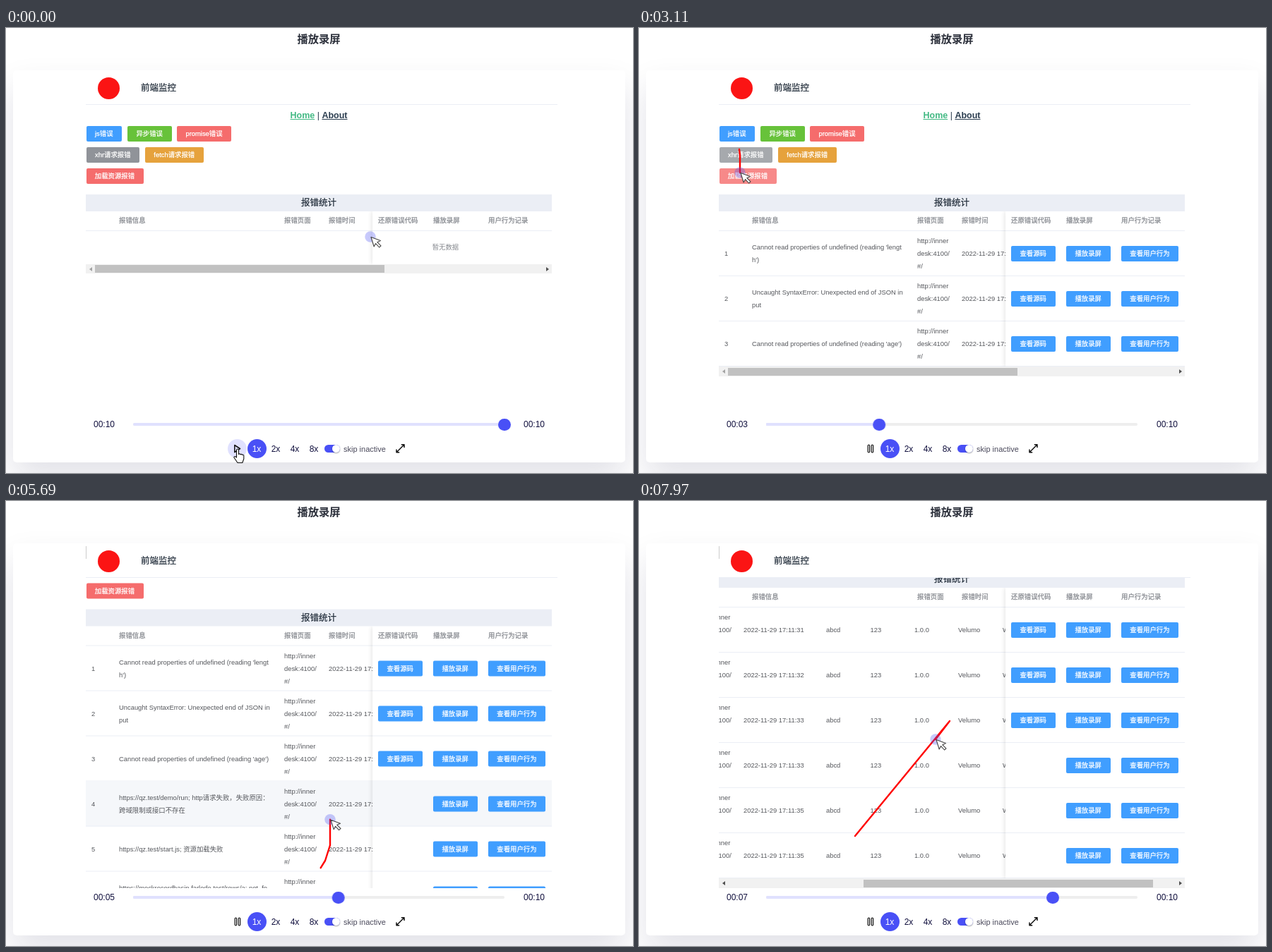
Recreate the animation shown at these times as an HTML page. Size 888 px wide and 631 px high, loop 8 s.

```html
<!DOCTYPE html>
<html lang="zh">
<head>
<meta charset="utf-8">
<title>播放录屏</title>
<style>
  html, body { margin: 0; width: 100%; height: 100%; overflow: hidden; background: #fff; }
  body { position: relative; font: 9.4px/18px "Liberation Sans", Arial, "Noto Sans CJK SC", "Noto Sans CJK", sans-serif; color: #55575c; }
  div, span, svg { position: absolute; }
  span { white-space: pre; }
  svg { left: 0; top: 0; overflow: visible; }
  .mid { transform: translateX(-50%); }
  .dark { color: #2c3e50; }
  .title { font-size: 15.3px; font-weight: 700; color: #2b2f3a; }
  .head { font-size: 12.5px; color: #25303d; }
  .nav { font-size: 12.5px; }
  .nav b { text-decoration: underline; }
  .nav b:first-child { color: #42b983; }
  .th { color: #85888e; }
  .head, .th, .btn { -webkit-text-stroke: .25px; }
  .ui { font-size: 12px; color: #11103e; }

  #card { left: 10px; top: 60px; width: 867px; height: 556px; border-radius: 5px; background: #fff; box-shadow: 0 24px 48px rgba(17, 16, 62, .12); }
  #view { left: 0; top: 60px; width: 888px; height: 489px; overflow: hidden; }
  #page { left: 0; top: -60px; width: 888px; height: 800px; animation: scroll 8s infinite; }
  #top { left: 113px; top: 0; width: 668px; height: 48px; background: #fff; border-bottom: 1px solid #ebeef5; }
  #edge { left: 113px; top: 64px; width: 1px; height: 18px; background: #ccc; }
  #logo { left: 130px; top: 70px; width: 31px; height: 31px; border-radius: 50%; background: #fb1414; }

  .btn { height: 22px; border-radius: 2px; color: #fff; line-height: 22px; text-align: center; white-space: nowrap; background: var(--c, #409eff); }
  .btn.lit { background: var(--l); }

  #caption { left: 113px; top: 236px; width: 660px; height: 23.5px; background: #ebeef5; }
  #thead { left: 113px; top: 287px; width: 660px; height: 1px; background: #ebeef5; }
  #rows { left: 113px; top: 288px; width: 660px; }
  .row { left: 0; width: 660px; height: 64px; box-sizing: border-box; border-bottom: 1px solid #ebeef5; }
  .row.hot { background: #f5f7fa; }
  .clip { left: 0; top: 0; width: 406px; height: 63px; overflow: hidden; }
  .cells { left: 0; top: 0; animation: pan 8s infinite; }
  #pinwrap { left: 505px; top: 260px; width: 268px; overflow: hidden; }
  #pin { left: 14px; top: 0; width: 270px; height: 100%; box-shadow: 0 0 7px rgba(0, 0, 0, .14); }
  #bar { left: 113px; width: 660px; height: 13.5px; background: #f1f1f1; }
  #grip { left: 13px; top: 1.5px; width: 410px; height: 10.5px; background: #c1c1c1; animation: grip 8s infinite; }
  .arrow { top: 4px; border: 3px solid transparent; }
  #left { left: 2px; border-right: 4px solid #a3a3a3; }
  #right { left: 652px; border-left: 4px solid #505050; }

  #track { left: 180px; top: 560px; width: 526px; height: 4px; background: #eee; border-radius: 2px; }
  #done { width: 526px; height: 4px; border-radius: 2px; background: #e0e1fe; transform-origin: 0 0; animation: fill 8s linear infinite; }
  #knob { left: -9px; top: -6.5px; width: 17.5px; height: 17.5px; border-radius: 50%; background: #4950f6; animation: seek 8s linear infinite; }
  .disc { width: 27px; height: 27px; border-radius: 50%; top: 583px; }
  #hover { left: 314px; background: #e0e1fe; }
  #speed { left: 341.5px; background: #4950f6; }
  #pill { left: 451px; top: 591px; width: 22px; height: 11px; border-radius: 6px; background: #4950f6; }
  #pill div { right: 0; width: 11px; height: 11px; border-radius: 50%; background: #fff; box-shadow: 0 1px 2px rgba(0, 0, 0, .35); }
  #hand { animation: hand 8s linear infinite; }

  @keyframes scroll {
    0%, 60.4% { transform: none; animation-timing-function: ease-in-out; }
    63.2%, 70.3% { transform: translateY(-70px); animation-timing-function: ease-in-out; }
    73.1%, 100% { transform: translateY(-137px); }
  }
  @keyframes pan {
    0%, 85.6% { transform: none; animation-timing-function: ease-in-out; }
    92.5%, 100% { transform: translateX(-309px); }
  }
  @keyframes grip {
    0%, 85.6% { transform: none; animation-timing-function: ease-in-out; }
    92.5%, 100% { transform: translateX(192px); }
  }
  @keyframes seek {
    0%, 2.499% { transform: translateX(526px); }
    2.5% { transform: translateX(13px); }
    100% { transform: translateX(407.5px); }
  }
  @keyframes fill {
    0%, 2.499% { transform: none; }
    2.5% { transform: scaleX(.0247); }
    100% { transform: scaleX(.7747); }
  }
  @keyframes hand {
    0%, 14.5% { transform: none; opacity: 1; }
    16.1%, 17.49% { transform: translate(-7.5px, -25px); opacity: 1; }
    17.5%, 100% { transform: translate(-7.5px, -25px); opacity: 0; }
  }
</style>
</head>
<body>
<span class="title mid" style="left:443px;top:7px">播放录屏</span>
<div id="card"></div>

<div id="view">
  <div id="page">
    <span class="nav dark mid" style="left:443px;top:115px"><b>Home</b> | <b>About</b></span>
    <div id="caption"></div>
    <span class="head mid" style="left:443px;top:239px">报错统计</span>
    <div id="thead"></div>
    <div id="rows"></div>
    <div id="bar">
      <div id="grip"></div>
      <div id="left" class="arrow"></div>
      <div id="right" class="arrow"></div>
    </div>
    <div id="pinwrap"><div id="pin"></div></div>
    <span id="empty" class="th mid" style="left:622.5px;top:302px;-webkit-text-stroke:0">暂无数据</span>
  </div>
  <div id="top"></div>
</div>
<div id="logo"></div>
<span class="head" style="left:191px;top:76px">前端监控</span>
<div id="edge"></div>

<div id="track"><div id="done"></div><div id="knob"></div></div>
<span id="clock" class="ui" style="left:124px;top:553px"></span>
<span class="ui" style="left:733px;top:553px">00:10</span>
<div id="hover" class="disc"></div>
<div id="speed" class="disc"></div>
<div id="pill"><div></div></div>
<span class="ui" style="left:478px;top:588px;font-size:11px;color:#4b4a5c">skip inactive</span>

<svg width="888" height="631" fill="none" stroke="#111" stroke-linejoin="round">
  <path id="play" d="M323.8 591.5L331.5 596.5L323.8 601.5Z" stroke-width="1.5"/>
  <path id="pause" d="M324.2 592.2a1.2 1.2 0 0 1 2.4 0v8.6a1.2 1.2 0 0 1-2.4 0zM329.2 592.2a1.2 1.2 0 0 1 2.4 0v8.6a1.2 1.2 0 0 1-2.4 0z" stroke-width="1.2"/>
  <path d="M553 601.7L564 590.7M559.8 590.7H564V595M553 597.5V601.7H557.2" stroke-width="1.5"/>
  <polyline id="tail" stroke="red" stroke-width="2.4" stroke-linecap="round"/>
  <g id="mouse">
    <circle id="halo" fill="#4950f6" stroke="none"/>
    <path d="M1 .5L5.2 14L7.6 9.6L12.6 15L15 12.8L9.8 7.7L14.5 5.6Z" fill="#fff" stroke="#444" stroke-width="1.1"/>
  </g>
  <path id="hand" fill="#fff" stroke-width="1.1" d="M326.5 609V598.5a1.5 1.5 0 0 1 3 0V604.5a1.4 1.4 0 0 1 2.6 .4a1.4 1.4 0 0 1 2.5 .5a1.3 1.3 0 0 1 2.2 1V611L334.8 616.5H328L323.2 609.5a1.3 1.3 0 0 1 1.8-1.8Z"/>
</svg>

<script>
const $ = id => document.getElementById(id);

function add(parent, tag, cls, x, y, text, extra = '') {
  const e = document.createElement(tag);
  e.className = cls;
  e.style.cssText = `left:${x}px;top:${y}px;${extra}`;
  e.textContent = text;
  return parent.appendChild(e);
}
const label = (parent, x, y, text, cls = '') => add(parent, 'span', cls, x, y - 9, text);
const button = (parent, x, y, w, text, css = '') => add(parent, 'div', 'btn', x, y, text, `width:${w}px;${css}`);

// text, x, y, width, colour, lit colour, lit from, lit to
const buttons = [
  ['js错误', 113.5, 139, 50.5, '#409eff', '#66b1ff', 700, 1480],
  ['异步错误', 172, 139, 62.5, '#67c23a', '#85ce61', 1265, 2050],
  ['promise错误', 242, 139, 77, '#f56c6c', '#f78989', 1700, 2850],
  ['xhr请求报错', 113.5, 169, 75.5, '#909399', '#a6a9ad', 2600, 3330],
  ['fetch请求报错', 197, 169, 82.5, '#e6a23c', '#ebb563', 3800, 8000],
  ['加载资源报错', 113.5, 198.5, 81, '#f56c6c', '#f78989', 3050, 4130]
].map(([text, x, y, w, c, l, from, to]) =>
  ({ from, to, el: button($('page'), x, y, w, text, `--c:${c};--l:${l}`) }));

[[160, '报错信息'], [394, '报错页面'], [457, '报错时间'], [527, '还原错误代码'], [605, '播放录屏'], [683, '用户行为记录']]
  .forEach(([x, text]) => label($('page'), x, 272.5, text, 'th'));

[[355, '1x'], [382, '2x'], [409, '4x'], [436, '8x']].forEach(([x, text], i) => {
  label(document.body, x, 597, text, 'ui mid').style.color = i ? '' : '#fff';
});

// time of arrival, seconds in the log, message lines
const MID = 31.5;
const rows = [
  [1120, 31, "Cannot read properties of undefined (reading 'lengt", "h')"],
  [1900, 32, 'Uncaught SyntaxError: Unexpected end of JSON in', 'put'],
  [2300, 33, "Cannot read properties of undefined (reading 'age')"],
  [3600, 33, 'https://qz.test/demo/run; http请求失败，失败原因：', '跨域限制或接口不存在'],
  [4760, 35, 'https://qz.test/start.js; 资源加载失败'],
  [5400, 35, 'https://mockrecordbasin.farlode.test/rows/a; not_fo', 'und']
].map(([at, sec, ...lines], i) => {
  const el = add($('rows'), 'div', 'row', 0, i * 64, '');
  const cells = add(add(el, 'div', 'clip', 0, 0, ''), 'div', 'cells', 0, 0, '');
  label(cells, 8, MID, i + 1);
  lines.forEach((s, k) => label(cells, 47, MID + (k - (lines.length - 1) / 2) * 18, s));
  ['http://inner', 'desk:4100/', '#/'].forEach((s, k) => label(cells, 281, MID + (k - 1) * 18, s));
  [[344, '2022-11-29 17:11:' + sec], [461, 'abcd'], [523.5, '123'], [586, '1.0.0'], [648, 'Velumo'], [711, 'W']]
    .forEach(([x, s]) => label(cells, x, MID, s));
  if (i < 3) button(el, 414, 21, 62.5, '查看源码');
  button(el, 492, 21, 62.5, '播放录屏');
  button(el, 570, 21, 81, '查看用户行为');
  return { at, el };
});

const path = [
  [0, 516, 296], [250, 516, 296], [450, 360, 225], [650, 215, 170], [820, 150, 151], [1255, 152, 151],
  [1270, 205, 147], [1290, 208, 149], [1560, 212, 150], [1800, 272, 146], [2150, 280, 149], [2400, 184, 147],
  [2610, 142, 172], [2880, 143, 180], [3110, 143, 205], [3450, 144, 208], [3800, 215, 186], [4000, 229, 181],
  [4190, 229, 181], [4300, 264, 207], [4430, 331, 277], [4570, 405, 385], [4655, 433, 440], [4690, 436, 451],
  [4850, 438, 486], [5010, 443, 510], [5160, 444, 523], [5300, 452, 510], [5470, 459, 488], [5700, 459, 450],
  [5970, 459, 463], [6300, 440, 500], [6700, 300, 528], [7300, 300, 528], [7470, 306, 475], [7760, 440, 312],
  [7970, 420, 338], [8000, 419, 339]
];
const cuts = [0, 1265];
const clicks = [1080, 1480, 2080, 2850, 3330, 4130];
// time, hovered table row
const hovers = [[0, 0], [4420, 1], [4540, 2], [4620, 3], [4960, 5], [5640, 4], [6650, 6], [7450, 0]];

function at(t) {
  const i = Math.max(1, path.findIndex(p => p[0] >= t));
  const [a, x, y] = path[i - 1], [b, u, v] = path[i];
  const k = (t - a) / (b - a);
  return [x + (u - x) * k, y + (v - y) * k];
}

// visibility keeps the CSS animations of hidden parts running
const show = (el, on) => { el.style.visibility = on ? '' : 'hidden'; };

function drawMouse(t) {
  const pos = at(t);
  const from = Math.max(t - 500, ...cuts.filter(c => c <= t));
  const tail = [at(from), ...path.filter(p => p[0] > from && p[0] < t).map(p => p.slice(1)), pos];
  const moved = tail.some(p => Math.hypot(p[0] - pos[0], p[1] - pos[1]) > .5);
  $('tail').setAttribute('points', moved ? tail.join(' ') : '');
  $('mouse').setAttribute('transform', `translate(${pos})`);
  const c = clicks.find(c => t >= c && t < c + 200);
  const press = c ? Math.sin((t - c) / 200 * Math.PI) : 0;
  $('halo').setAttribute('r', 7.7 - 3.8 * press);
  $('halo').setAttribute('opacity', .3 + .2 * press);
}

function render(t) {
  const playing = t >= 200;
  show($('play'), !playing);
  show($('pause'), playing);
  show($('hover'), t < 1220);
  show($('edge'), t >= 5500);
  const secs = playing ? (68 + .0506 * (t - 1290)) / 526 * 10.2 : 10;
  $('clock').textContent = '00:' + String(Math.floor(secs)).padStart(2, '0');

  buttons.forEach(b => b.el.classList.toggle('lit', t >= b.from && t < b.to));
  const count = rows.filter(r => t >= r.at).length;
  const hot = hovers.filter(h => t >= h[0]).pop()[1];
  rows.forEach((r, i) => {
    show(r.el, i < count);
    r.el.classList.toggle('hot', i + 1 === hot);
  });
  show($('empty'), !count);
  const bottom = count ? 288 + 64 * count : 334.5;
  $('bar').style.top = bottom + 'px';
  $('pinwrap').style.height = bottom - 260 + 'px';
  $('left').style.borderRightColor = t > 6850 ? '#505050' : '#a3a3a3';
  drawMouse(t);
}

let start;
function tick(now) {
  start ??= now;
  render((now - start) % 8000);
  requestAnimationFrame(tick);
}
render(0);
requestAnimationFrame(tick);
</script>
</body>
</html>
```
